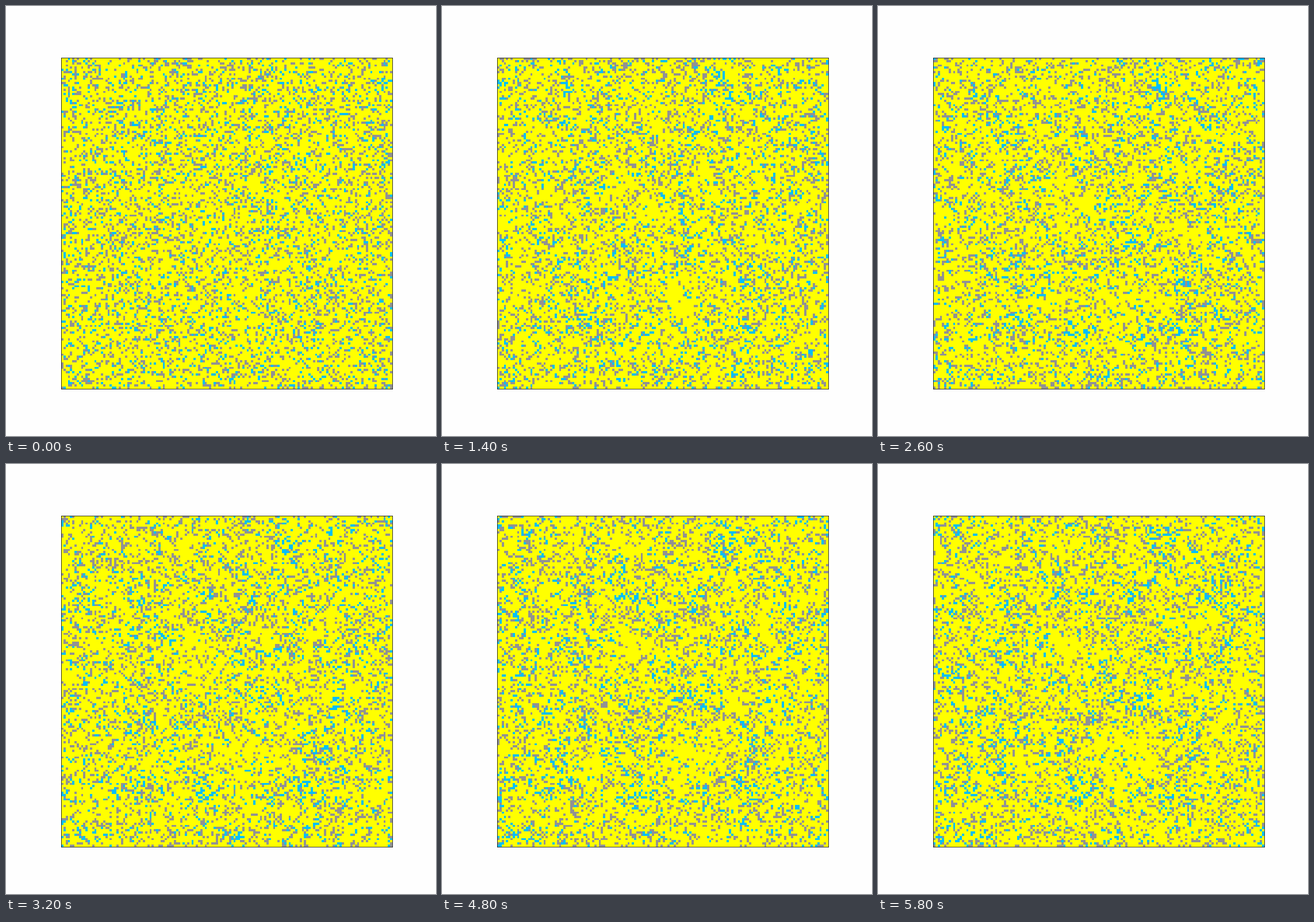
A matplotlib script for the animation above (6000 ms loop, 748 by 748 pixels).

```python
import random

import numpy as np
import matplotlib.pyplot as plt
from matplotlib.animation import FuncAnimation
from matplotlib.colors import ListedColormap

SIZE, DPI = 748, 72
N = 150                            # cells per side
LEFT, BOTTOM, SIDE = 96, 82, 576   # plot box in pixels
STEPS, INTERVAL = 30, 200
HOPS = 2
EMPTY, GRAY, BLUE = 0, 1, 2
SHARE = {GRAY: 0.175, BLUE: 0.077}
TURNOVER = {GRAY: 0.06, BLUE: 0.15}
AROUND = [(a, b) for a in (-1, 0, 1) for b in (-1, 0, 1) if a or b]

rng = random.Random(7)


def start():
    grid = np.zeros(N * N, dtype=int)
    cells = rng.sample(range(N * N), N * N)
    first = 0
    for kind, share in SHARE.items():
        last = first + int(share * N * N)
        grid[cells[first:last]] = kind
        first = last
    return grid.reshape(N, N)


def free_neighbour(grid, r, c):
    """Random adjacent cell on the torus, or None when it is taken."""
    dr, dc = rng.choice(AROUND)
    cell = (r + dr) % N, (c + dc) % N
    return cell if grid[cell] == EMPTY else None


def occupied(grid, kinds):
    cells = [tuple(p) for p in np.argwhere(np.isin(grid, kinds)).tolist()]
    rng.shuffle(cells)
    return cells


def wander(grid):
    for cell in occupied(grid, [GRAY, BLUE]):
        target = free_neighbour(grid, *cell)
        if target:
            grid[target], grid[cell] = grid[cell], EMPTY


def breed(grid, kind):
    """Every birth beside a parent is balanced by one death."""
    cells = occupied(grid, [kind])
    count = int(TURNOVER[kind] * len(cells))
    for dead, parent in zip(cells[:count], cells[count:2 * count]):
        child = free_neighbour(grid, *parent)
        if child:
            grid[child], grid[dead] = kind, EMPTY


def step(grid):
    grid = grid.copy()
    for _ in range(HOPS):
        wander(grid)
    for kind in TURNOVER:
        breed(grid, kind)
    return grid


states = [start()]
for _ in range(STEPS - 2):
    states.append(step(states[-1]))

fig = plt.figure(figsize=(SIZE / DPI, SIZE / DPI), dpi=DPI, facecolor="#fefefe")
ax = fig.add_axes([LEFT / SIZE, BOTTOM / SIZE, SIDE / SIZE, SIDE / SIZE],
                  xticks=[], yticks=[])
image = ax.imshow(
    states[0], cmap=ListedColormap(["#ffff00", "#929292", "#00bfff"]),
    vmin=EMPTY, vmax=BLUE, interpolation="nearest", aspect="auto")
ax.set(xticks=[], yticks=[])
ax.spines[:].set_linewidth(0.8)


def update(i):
    # the opening state is held for two ticks
    image.set_data(states[max(0, i - 1)])
    return [image]


anim = FuncAnimation(fig, update, frames=STEPS, interval=INTERVAL, repeat=True)
plt.show()
```
